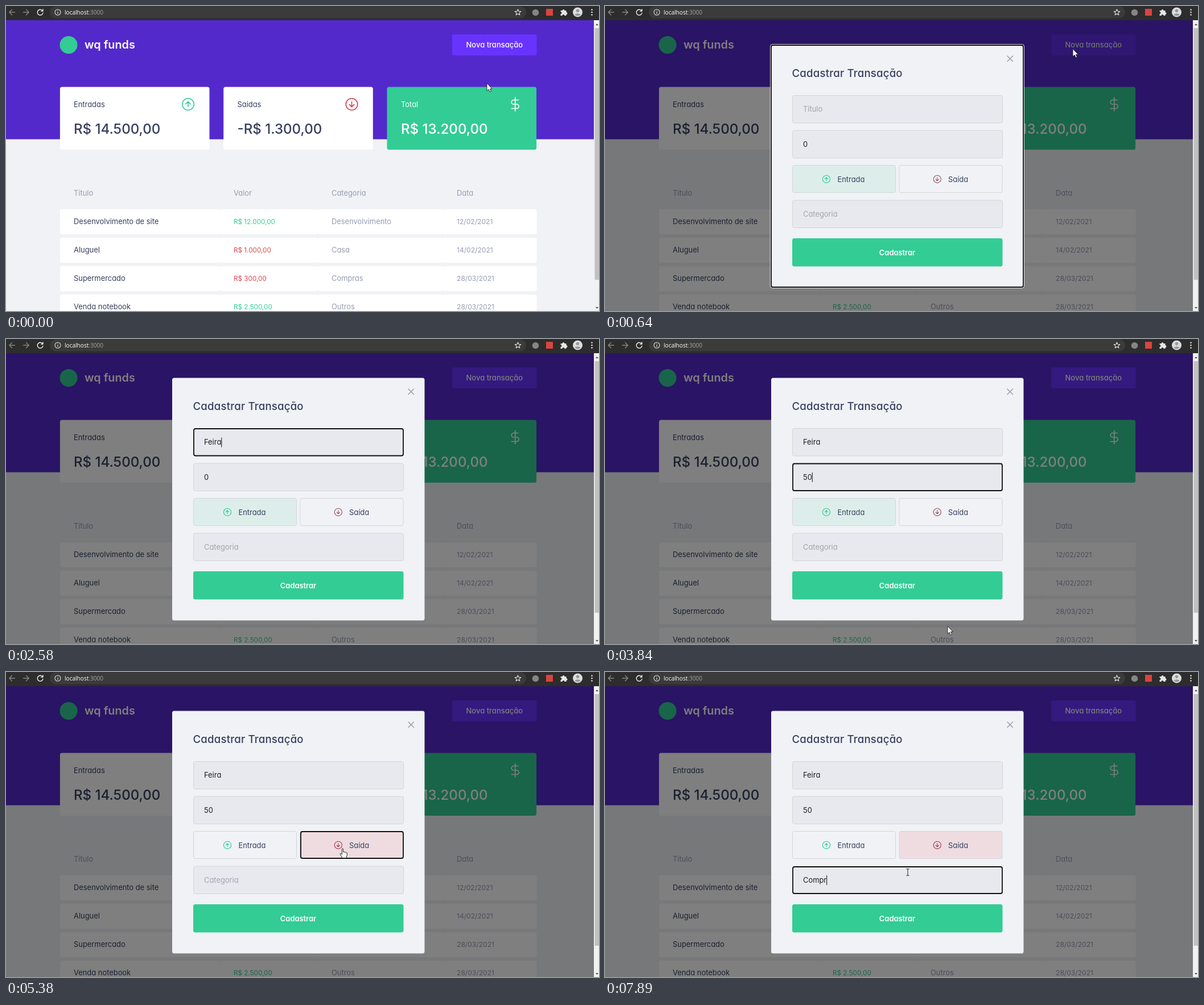
An HTML page for the animation above (8000 ms loop, 1042x537 px).

```html
<!DOCTYPE html>
<html lang="pt-BR">
<head>
<meta charset="utf-8">
<title>Finanças</title>
<style>
html, body { margin: 0; width: 100%; height: 100%; overflow: hidden; background: #f0f2f5; }
svg { display: block; }
text { font: 400 12.9px Inter, "Open Sans", sans-serif; font-feature-settings: "cv11"; fill: #363f5f; white-space: pre; }
.url { font: 10.1px "Open Sans", sans-serif; fill: #fff; }
.brand { font-size: 19.8px; font-weight: 600; fill: #fff; }
.sum { font-size: 24.1px; font-weight: 500; }
.light { fill: #fff; }
.action { font-size: 13px; font-weight: 500; }
.soft { fill: #969cb3; }
.date { font-size: 12.1px; }
.money { font-size: 11.7px; }
.in { fill: #33cc95; }
.out { fill: #dc464f; }
.heading { font-size: 18.6px; font-weight: 500; letter-spacing: .2px; }
.send { font-weight: 600; fill: #fff; text-anchor: middle; }
.line { fill: none; stroke-linecap: round; stroke-linejoin: round; }
.box { fill: #e7e9ee; stroke: #d3d5da; }
.choice { fill: #f0f2f5; stroke: #d3d5da; }
.choice.picked-in { fill: #ddeeea; }
.choice.picked-out { fill: #efdce1; }
.choice.hover { stroke: #a9abb0; }
.dim { filter: brightness(.9); }
.value { fill: #1c1c1f; }
.value.empty { fill: #9fa4ae; }
.value.marked { fill: #fff; }
</style>
</head>
<body>
<svg width="1042" height="537" viewBox="0 0 1042 537">
  <defs>
    <g id="dollar" class="line" stroke="#fff" stroke-width="1.5">
      <path d="M0-11V11M5-7H-2.5a3.5 3.5 0 0 0 0 7h5a3.5 3.5 0 0 1 0 7H-6"/>
    </g>
    <g id="up" class="line">
      <circle r="10.3"/><path d="M0 4.5V-4.5M-4.2-.4L0-4.6L4.2-.4"/>
    </g>
  </defs>

  <!-- page -->
  <rect y="25" width="1042" height="512" fill="#f0f2f5"/>
  <rect y="24" width="1033" height="210.6" fill="#5429cc"/>
  <circle cx="110" cy="68.5" r="15.5" fill="#33cc95"/>
  <text class="brand" x="138" y="75">wq funds</text>
  <g id="open">
    <rect x="784" y="50" width="148.5" height="37" rx="3" fill="#6933ff"/>
    <text class="light action" x="808.5" y="73.3">Nova transação</text>
  </g>

  <g fill="#fff">
    <rect x="94.9" y="142.4" width="262.6" height="110.6" rx="3.5"/>
    <rect x="382.2" y="142.4" width="262.6" height="110.6" rx="3.5"/>
    <rect x="669.5" y="142.4" width="262.6" height="110.6" rx="3.5" fill="#33cc95"/>
  </g>
  <text x="119" y="178">Entradas</text>
  <text x="406.5" y="178">Saidas</text>
  <text class="light" x="694" y="178">Total</text>
  <text class="sum" x="119" y="224.5">R$ 14.500,00</text>
  <text class="sum" x="406.5" y="224.5">-R$ 1.300,00</text>
  <text class="sum light" x="694" y="224.5">R$ 13.200,00</text>
  <use href="#up" x="320" y="173" stroke="#33cc95" stroke-width="1.6"/>
  <use href="#up" transform="translate(607.5 173) rotate(180)" stroke="#dc3a50" stroke-width="1.6"/>
  <use href="#dollar" transform="translate(894.7 173) scale(1.08)"/>
  <g id="table"></g>

  <!-- scrollbar -->
  <rect x="1033" y="25" width="9" height="512" fill="#f1f1f1"/>
  <rect x="1034.5" y="39" width="7.5" height="443" fill="#c1c1c1"/>
  <path d="M1036 34l2.5-3 2.5 3zM1036 530l2.5 3 2.5-3z" fill="#505050"/>

  <!-- dialog -->
  <g id="dialog">
    <rect y="25" width="1033" height="512" opacity=".5"/>
    <rect x="292" y="68.5" width="443.5" height="427" rx="3.5" fill="#f0f2f5"/>
    <path class="line" d="M707 88l9.5 9.5m0-9.5l-9.5 9.5" stroke="#989da8" stroke-width="1.5"/>
    <text class="heading" x="328.5" y="125.2">Cadastrar Transação</text>
    <rect class="box" x="329.5" y="157.5" width="369" height="48.5" rx="3"/>
    <rect class="box" x="329.5" y="219" width="369" height="48.5" rx="3"/>
    <rect class="box" x="329.5" y="342" width="369" height="48.5" rx="3"/>
    <rect id="income" class="choice" x="329.5" y="280.5" width="181" height="48" rx="3"/>
    <rect id="expense" class="choice" x="517" y="280.5" width="181" height="48" rx="3"/>
    <use href="#up" transform="translate(389 304.8) scale(.64)" stroke="#33cc95" stroke-width="1.8"/>
    <use id="down" href="#up" transform="translate(583.8 304.8) rotate(180) scale(.64)" stroke-width="1.8"/>
    <text x="408.5" y="309.5">Entrada</text>
    <text x="603" y="309.5">Saída</text>
    <g id="send">
      <rect x="329" y="409" width="369.5" height="49.5" rx="3.5" fill="#33cc95"/>
      <text class="send" x="513.5" y="438.6">Cadastrar</text>
    </g>
    <rect id="mark" x="348" y="235" height="17" fill="#0078d7"/>
    <text class="value" x="348" y="186.4"></text>
    <text class="value" x="348" y="247.9"></text>
    <text class="value" x="348" y="371"></text>
    <rect id="caret" width="1" height="17" fill="#111"/>
  </g>

  <g id="focus" fill="none">
    <rect stroke="#fff" rx="3"/>
    <rect stroke="#101010" stroke-width="1.8" rx="3"/>
  </g>

  <!-- browser bar -->
  <rect width="1042" height="25" fill="#2d2d2e"/>
  <rect x="77" y="0.5" width="837" height="21" rx="10.5" fill="#3b3b3c"/>
  <g class="line" stroke="#858587" stroke-width="1.4">
    <path d="M15.5 11H6m4.5-4.7L5.8 11l4.7 4.7M30.5 11H40m-4.5-4.7L40.2 11l-4.7 4.7"/>
    <path d="M63.8 7.9a4.9 4.9 0 1 0 1.1 4.4M64.9 5.8v3.3h-3.3" stroke="#f1f1f1"/>
    <g stroke="#e6e6e6" stroke-width="1.1">
      <circle cx="91" cy="11" r="5"/><path d="M91 10.6v3M91 8.4v.1"/>
      <path d="M899.5 5.8l1.5 3.5 3.8.3-2.9 2.5.9 3.7-3.3-2-3.3 2 .9-3.7-2.9-2.5 3.8-.3z"/>
    </g>
  </g>
  <text class="url" x="103" y="14.7">localhost<tspan fill="#a4a4a6">:3000</tspan></text>
  <circle cx="930.5" cy="11.5" r="5.8" fill="#858587"/>
  <rect x="949" y="5" width="12" height="12" fill="#d8453f"/>
  <path d="M974.5 8h3a2 2 0 1 1 4 0h3v3a2 2 0 1 1 0 4v2h-3a2 2 0 0 0-4 0h-3v-3a2 2 0 0 0 0-4z" fill="#e6e6e6"/>
  <circle cx="1004.5" cy="11" r="8.5" fill="#dcdddf"/>
  <path d="M999 15.5q5.5-5 11 0q-5.5 4-11 0z" fill="#96989b"/>
  <circle cx="1004.5" cy="8.3" r="2.7" fill="#96989b"/>
  <g fill="#e6e6e6"><circle cx="1029.5" cy="6.5" r="1.3"/><circle cx="1029.5" cy="11" r="1.3"/><circle cx="1029.5" cy="15.5" r="1.3"/></g>

  <!-- pointer -->
  <g id="pointer">
    <circle id="press" r="9" fill="#f3e52f" opacity=".82"/>
    <path id="arrow" d="M0 0V13.5L3.1 10.7L5.2 15.3L7.4 14.3L5.3 9.9H9.4Z" fill="#fff" stroke="#111" stroke-width=".8"/>
    <path id="beam" class="line" d="M-2-5.5Q0-5.5 0-4.5Q0-5.5 2-5.5M0-5V6M-2 6.5Q0 6.5 0 5.5Q0 6.5 2 6.5" stroke="#222" stroke-width="1"/>
    <path id="hand" d="M-1 .5Q0-.8 1.2.5V6Q2.5 5 3.7 6.3Q5 5.6 6 6.9Q7.7 6.5 8 8V11.5L6.5 16.5H0L-4.2 10Q-4.5 8.2-2.7 8.6L-1 10.2Z" fill="#fff" stroke="#111" stroke-width=".9"/>
  </g>
</svg>

<script>
const LOOP = 8000, STEP = 78.6;
const $ = id => document.getElementById(id);
const show = (id, on) => $(id).setAttribute('visibility', on ? 'visible' : 'hidden');
const set = (el, attrs) => { for (const k in attrs) el.setAttribute(k, attrs[k]); };
const within = (t, spans) => spans.some(([a, b]) => t >= a && t < b);
const latest = (list, t) => list.filter(e => e[0] <= t).pop();

function buildTable() {
  const cols = [119, 400, 572, 792], edges = [95, 376, 548, 768, 932.5];
  const rows = [
    ['Desenvolvimento de site', 'R$ 12.000,00', 'Desenvolvimento', '12/02/2021', 'in'],
    ['Aluguel', 'R$ 1.000,00', 'Casa', '14/02/2021', 'out'],
    ['Supermercado', 'R$ 300,00', 'Compras', '28/03/2021', 'out'],
    ['Venda notebook', 'R$ 2.500,00', 'Outros', '28/03/2021', 'in'],
  ];
  const text = (s, i, y, cls) => `<text class="${cls}" x="${cols[i]}" y="${y}">${s}</text>`;
  let html = ['Título', 'Valor', 'Categoria', 'Data'].map((s, i) => text(s, i, 334, 'soft')).join('');
  rows.forEach((row, r) => {
    const y = 358 + 50 * r, styles = ['', 'money ' + row[4], 'soft', 'date soft'];
    cols.forEach((_, i) => {
      html += `<rect x="${edges[i]}" y="${y}" width="${edges[i + 1] - edges[i]}" height="44" rx="3" fill="#fff"/>`
        + text(row[i], i, y + 26, styles[i]);
    });
  });
  $('table').innerHTML = html;
}

// [time, x, y]
const path = [
  [0, 845, 136], [80, 845, 136], [400, 822, 75.5], [640, 822, 75.5], [870, 735, 112], [1080, 560, 181],
  [3670, 560, 181], [3670, 600, 545], [4320, 613, 296], [5160, 613, 296], [5850, 532, 352], [LOOP, 532, 352],
];
const presses = [[400, 560], [1160, 1310], [4770, 4930], [6340, 6470]];
const carets = [[1160, 1690], [1940, 2970], [3600, 4280], [6340, 6870], [7190, LOOP]];

// [time, x, y, width, height]
const focusStops = [
  [0, 0, 0, 0, 0], [400, 784, 50, 148.5, 37], [640, 292, 69, 443, 426], [1160, 330, 158, 368, 47.5],
  [2970, 330, 219.5, 368, 47.5], [4770, 518, 281, 180, 47], [6340, 330, 343, 368, 47],
];

const grow = (word, times) => times.map((t, i) => [t, word.slice(0, i + 1)]);
const fields = [
  { hint: 'Título', typed: grow('Feira', [1940, 2090, 2340, 2420, 2580]) },
  { hint: '', typed: [[0, '0'], ...grow('50', [3600, 3680])] },
  { hint: 'Categoria', typed: grow('Compr', [7190, 7420, 7570, 7730, 7890]) },
];
const values = [...document.querySelectorAll('.value')];

function pointAt(t) {
  const q = Math.floor(t / STEP) * STEP;
  const i = path.findIndex(p => p[0] > q), [a, b] = [path[i - 1], path[i]];
  const k = (q - a[0]) / (b[0] - a[0]);
  return [a[1] + (b[1] - a[1]) * k, a[2] + (b[2] - a[2]) * k];
}

function drawPointer(t) {
  const [x, y] = pointAt(t);
  const visible = !within(t, [[1560, 3670]]), open = t >= 640;
  const inside = (top, bottom) => open && x > 329 && x < 699 && y >= top && y <= bottom;
  const beam = inside(157, 206) || inside(219, 268) || inside(342, 391);
  const hand = inside(280, 329);
  $('pointer').setAttribute('transform', `translate(${x} ${y})`);
  show('press', within(t, presses));
  show('beam', visible && beam);
  show('hand', visible && hand);
  show('arrow', visible && !beam && !hand);
  $('send').classList.toggle('dim', visible && inside(409, 458));
  $('expense').classList.toggle('hover', visible && hand);
}

function drawFocus(t) {
  const [, x, y, width, height] = latest(focusStops, t);
  const [halo, ring] = $('focus').children;
  show('focus', width > 0);
  set(ring, { x, y, width, height });
  set(halo, { x: x - 1.3, y: y - 1.3, width: width + 2.6, height: height + 2.6, opacity: t < 1160 ? 1 : 0 });
}

function drawFields(t) {
  const marked = within(t, [[2970, 3600]]);
  fields.forEach((f, i) => {
    const entry = latest(f.typed, t);
    values[i].textContent = entry ? entry[1] : f.hint;
    values[i].classList.toggle('empty', !entry);
  });
  values[1].classList.toggle('marked', marked);
  show('mark', marked);
  $('mark').setAttribute('width', values[1].getComputedTextLength());

  const active = t < 2970 ? 0 : t < 4770 ? 1 : 2;
  const typed = latest(fields[active].typed, t);
  set($('caret'), {
    x: 348 + (typed ? values[active].getComputedTextLength() : 0),
    y: [173.5, 235, 358][active],
  });
  show('caret', within(t, carets));
}

function draw(t) {
  const spent = t >= 4930;
  $('dialog').style.display = t >= 640 ? '' : 'none';
  $('open').classList.toggle('dim', within(t, [[320, 710]]));
  $('income').classList.toggle('picked-in', !spent);
  $('expense').classList.toggle('picked-out', spent);
  $('down').setAttribute('stroke', spent ? '#a63a50' : '#96545d');
  drawFields(t);
  drawFocus(t);
  drawPointer(t);
}

function frame() {
  draw(performance.now() % LOOP);
  requestAnimationFrame(frame);
}

buildTable();
frame();
</script>
</body>
</html>
```
